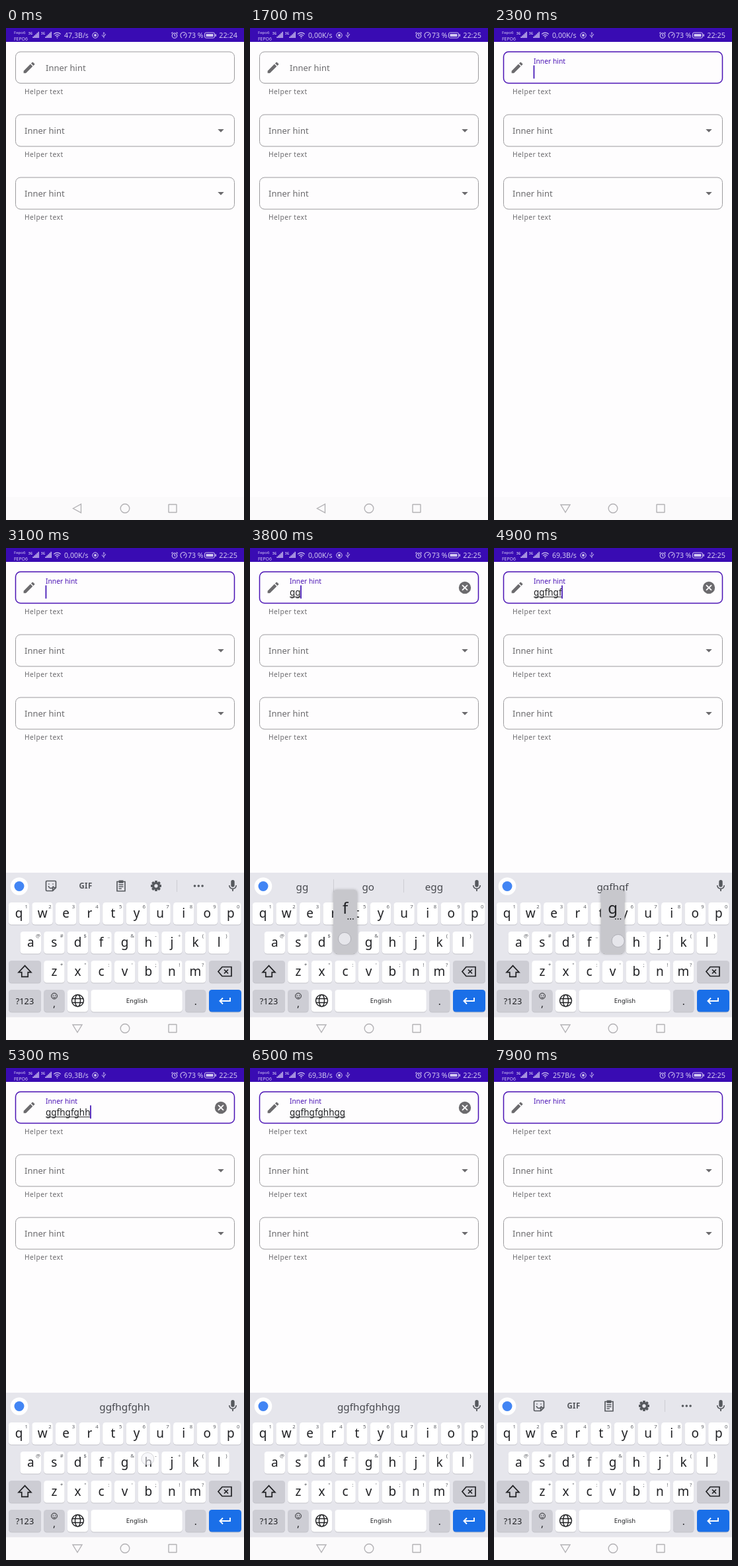
These frames come from a looping animation (360 by 744 pixels, 8000 ms). An HTML page with a canvas:

```html
<!DOCTYPE html>
<html lang="en">
<head>
<meta charset="utf-8">
<title>Text fields</title>
<style>
html, body { margin: 0; width: 100%; height: 100%; overflow: hidden; background: #fefdfe; }
canvas { display: block; width: 360px; height: 744px; }
</style>
</head>
<body>
<canvas id="stage"></canvas>
<script>
const canvas = document.getElementById('stage');
const c = canvas.getContext('2d');
const ratio = window.devicePixelRatio || 1;
canvas.width = 360 * ratio;
canvas.height = 744 * ratio;

const LOOP = 8000, FOCUS = 2100, CLEAR = 7400;
const PURPLE = '#4a12b4', GREY = '#6c6b6e', DARK = '#202124', ICON = '#55585d', STATUS = '#d3c9f2';
const WORD = 'ggfhgfghhgg';
const COMMITS = [3300, 3600, 3850, 4150, 4500, 4800, 5000, 5150, 5300, 5450, 5600];
const SUGGEST = { g: ['g', 'go', 'good'], gg: ['gg', 'go', 'egg'], ggf: ['ggf', 'gift', 'golf'], ggfh: ['ggfh', 'high', 'Gobu'] };
const ROWS = [
  { keys: 'qwertyuiop', hints: '1234567890', x: 19.5, y: 536 },
  { keys: 'asdfghjkl', hints: '@#$_&-+()', x: 37.3, y: 580 },
  { keys: 'zxcvbnm', hints: '*":\';!?', x: 72.9, y: 624 }
];
const PITCH = 35.6;

// Icons on a 24 unit grid
const ICONS = {
  pencil: 'M3 17.25V21h3.75L17.81 9.94l-3.75-3.75zM20.71 7.04a1 1 0 0 0 0-1.41l-2.34-2.34a1 1 0 0 0-1.41 0l-1.83 1.83 3.75 3.75z',
  cancel: 'M12 2a10 10 0 0 0 0 20a10 10 0 0 0 0-20zm5 13.6L15.6 17 12 13.4 8.4 17 7 15.6 10.6 12 7 8.4 8.4 7 12 10.6 15.6 7 17 8.4 13.4 12z',
  mic: 'M12 14a3 3 0 0 0 3-3V5a3 3 0 0 0-6 0v6a3 3 0 0 0 3 3zM17 11a5 5 0 0 1-10 0H5.3a6.7 6.7 0 0 0 5.7 6.6V21h2v-3.4a6.7 6.7 0 0 0 5.7-6.6z',
  shift: 'M12 3.5L3 13h4.5v6.5h9V13H21z',
  erase: 'M8 5H22V19H8L2 12zM11 9l6 6M17 9l-6 6',
  globe: 'M3 12a9 9 0 1 0 18 0a9 9 0 1 0-18 0M3.6 9h16.8M3.6 15h16.8M12 3a4 9 0 0 0 0 18a4 9 0 0 0 0-18',
  enter: 'M20 8v5H4.5M9 8.5L4.5 13 9 17.5',
  sticker: 'M5 3.5h14a1.5 1.5 0 0 1 1.5 1.5v10L15 20.5H5A1.5 1.5 0 0 1 3.5 19V5A1.5 1.5 0 0 1 5 3.5zM15 20v-5h5M8 12a4 4 0 0 0 8 0M8.5 8v1.5M15.5 8v1.5',
  clipboard: 'M5 4.5h14v16.5H5zM9 3h6v3H9zM8 10h8M8 13.5h8M8 17h5',
  wifi: 'M2 9a14 14 0 0 1 20 0M5.5 13a9 9 0 0 1 13 0M9 16.5a4.5 4.5 0 0 1 6 0M11 20h2',
  alarm: 'M4 13a8 8 0 1 0 16 0a8 8 0 1 0-16 0M12 8v5l3 2M2 6l4-4M22 6l-4-4',
  gauge: 'M7 21a10 10 0 1 1 10 0M12 14l5-6',
  usb: 'M12 22V2M9 5l3-3 3 3M12 18l-6-4v-4M12 15l6-4V7'
};
for (const name in ICONS) ICONS[name] = new Path2D(ICONS[name]);

const clamp = v => Math.max(0, Math.min(1, v));
const progress = (t, from, to) => clamp((t - from) / (to - from));
const mix = (a, b, p) => a + (b - a) * p;
const easeOut = p => 1 - (1 - p) ** 3;
const smooth = p => p * p * (3 - 2 * p);

function text(s, x, y, size, color, align = 'left', weight = 400, spacing = 0) {
  c.font = `${weight} ${size}px "Noto Sans", sans-serif`;
  c.letterSpacing = spacing + 'px';
  c.textAlign = align;
  c.fillStyle = color;
  c.fillText(s, x, y);
  return c.measureText(s).width;
}

function paint(fill, stroke, width = 1) {
  if (fill) { c.fillStyle = fill; c.fill(); }
  if (stroke) { c.strokeStyle = stroke; c.lineWidth = width; c.stroke(); }
}

function box(x, y, w, h, r, fill, stroke, width) {
  c.beginPath();
  c.roundRect(x, y, w, h, r);
  paint(fill, stroke, width);
}

function disc(x, y, r, fill, stroke, width) {
  c.beginPath();
  c.arc(x, y, r, 0, 7);
  paint(fill, stroke, width);
}

function poly(points, fill, stroke, width) {
  c.beginPath();
  points.forEach(([x, y]) => c.lineTo(x, y));
  c.closePath();
  paint(fill, stroke, width);
}

function icon(name, x, y, scale, color, lineWidth) {
  c.save();
  c.translate(x - 12 * scale, y - 12 * scale);
  c.scale(scale, scale);
  c.fillStyle = c.strokeStyle = color;
  c.lineWidth = lineWidth;
  if (lineWidth) c.stroke(ICONS[name]); else c.fill(ICONS[name]);
  c.restore();
}

function faded(alpha, draw) {
  c.save();
  c.globalAlpha = alpha;
  draw();
  c.restore();
}

function touch(x, y, alpha = 1) {
  faded(alpha, () => disc(x, y, 9.5, 'rgba(240,240,246,.75)', 'rgba(110,110,120,.35)'));
}

function statusBar(t) {
  box(0, 0, 360, 21, 0, '#390bb3');
  text('Fepo6', 12, 9, 6.1, STATUS);
  text('FEPO6', 12, 18.5, 6.9, STATUS);
  for (const x of [34, 53]) {
    text('3G', x, 10, 4.6, STATUS, 'left', 600);
    for (let i = 0; i < 5; i++) box(x + 6.5 + i * 2, 13 - i * 1.8, 1.4, 2 + i * 1.8, 0, STATUS);
  }
  icon('wifi', 77.5, 11, .53, STATUS, 2.2);
  const speed = t < 900 ? '47,3B/s' : t < 3900 ? '0,00K/s' : t < 6900 ? '69,3B/s' : '257B/s';
  text(speed, t < 6900 ? 88 : 89, 15, 10.6, STATUS);
  disc(135, 11, 4.2, null, STATUS);
  box(133.3, 9.3, 3.4, 3.4, .5, STATUS);
  icon('usb', 148, 11, .42, STATUS, 2);
  icon('alarm', 255, 11, .47, STATUS, 2.4);
  icon('gauge', 268.5, 11, .46, STATUS, 2.2);
  text('73 %', 275, 15, 10.5, STATUS);
  box(300.5, 7, 15, 8, 2, null, STATUS);
  box(302.5, 9, 11, 4, .5, STATUS);
  box(316.5, 9.3, 1.5, 3.4, .5, STATUS);
  text(t < 1700 ? '22:24' : '22:25', 350, 15, 10.9, STATUS, 'right');
}

function inputField(t, value, lastEvent) {
  const p = smooth(progress(t, FOCUS, FOCUS + 170));
  const focused = t >= FOCUS;
  box(14.5, 36, 331, 47.5, 7.5, null, focused ? PURPLE : '#9c9b9e', focused ? 1.5 : 1);
  icon('pencil', 35, 60, .93, GREY);
  text('Inner hint', 60, mix(65, 54, p), mix(13, 10.3, p), focused ? PURPLE : GREY);
  text('Helper text', 28, 100, 10.3, GREY, 'left', 400, .45);
  let width = 0;
  if (value) {
    width = text(value, 60, 72, 13.5, DARK);
    box(60, 73.5, width, 1, 0, DARK);
  }
  if (focused && Math.floor((t - lastEvent) / 500) % 2 === 0) box(59.6 + width, 56.5, 1.7, 20, 0, '#3f10b4');

  const shown = t < CLEAR ? progress(t, 3300, 3420) : 1 - progress(t, CLEAR, CLEAR + 100);
  if (shown) faded(shown, () => icon('cancel', 325, 60, .92, GREY));
  const ripple = progress(t, 7150, 7500);
  if (ripple > 0 && ripple < 1) faded(.14 * (1 - ripple ** 3), () => disc(325, 60, 8 + 11 * easeOut(ripple), '#000'));
}

function dropdown(y) {
  box(14.5, y, 331, 48, 7.5, null, '#9c9b9e');
  text('Inner hint', 28, y + 29, 13, GREY);
  text('Helper text', 28, y + 64, 10.3, GREY, 'left', 400, .45);
  poly([[320.3, y + 22], [329.7, y + 22], [325, y + 26.8]], GREY);
}

function toolbar() {
  icon('sticker', 68, 511, .88, ICON, 1.9);
  text('GIF', 120.5, 515, 11.5, ICON, 'center', 800, .3);
  icon('clipboard', 174, 511, .86, ICON, 1.9);
  for (let i = 0; i < 8; i++) {
    c.save();
    c.translate(227, 511);
    c.rotate(i * Math.PI / 4);
    box(-1.9, -8, 3.8, 5, .8, ICON);
    c.restore();
  }
  disc(227, 511, 4.4, null, ICON, 3.4);
  box(258, 502, 1, 18, 0, '#cdcdd3');
  for (const x of [285.5, 291.3, 297.1]) disc(x, 511, 1.8, ICON);
}

function suggestions(value) {
  const words = SUGGEST[value];
  if (!words) return text(value, 179.5, 517.5, 15.25, '#47494e', 'center');
  words.forEach((word, i) => text(word, 79 + i * 99.7, 517.5, 15.25, '#47494e', 'center'));
  for (const x of [126, 232]) box(x, 501, 1, 20, 0, '#cdcdd3');
}

function key(x, y, w, fill = '#fff') {
  box(x, y + 1, w, 33.5, 4.5, '#c3c3c9');
  box(x, y, w, 33.5, 4.5, fill);
}

function keyboard(value) {
  box(0, 491, 360, 219, 0, '#e6e6ec');
  disc(20, 511.5, 13.3, '#fff');
  disc(20, 511.5, 7.5, '#4285f4');
  icon('mic', 343, 511, .9, ICON);
  if (value) suggestions(value); else toolbar();

  for (const { keys, hints, x, y } of ROWS) {
    [...keys].forEach((letter, i) => {
      const cx = x + i * PITCH;
      key(cx - 15.7, y, 31.4);
      text(letter, cx, y + 22.7, 19, DARK, 'center');
      text(hints[i], cx + 11.3, y + 9, 7.8, '#5c5e63', 'center');
    });
  }
  const soft = '#cdcdd4';
  key(4, 624, 49, soft);
  icon('shift', 28.5, 640.5, 1.05, DARK, 1.6);
  key(307, 624, 49, soft);
  icon('erase', 331, 640.5, 1, DARK, 1.7);

  key(4, 668, 49, soft);
  text('?123', 28.5, 689.5, 12.8, DARK, 'center');
  key(57.2, 668, 31.4, soft);
  disc(73, 677.5, 4.4, null, DARK);
  disc(71.4, 676.4, .7, DARK);
  disc(74.6, 676.4, .7, DARK);
  c.beginPath();
  c.arc(73, 677.8, 2.2, .3, 2.84);
  paint(null, DARK, .9);
  text(',', 73, 694, 15, DARK, 'center');
  key(92.8, 668, 31.4);
  icon('globe', 108.5, 684.5, 1, DARK, 1.4);
  key(128.4, 668, 138.4);
  text('English', 198, 688.3, 9.5, DARK, 'center');
  key(271, 668, 31.4, soft);
  text('.', 286.8, 691, 15, DARK, 'center');
  key(307, 668, 49, '#1a6fe8');
  icon('enter', 331, 684, 1, '#fff', 1.9);
}

function keyPress(t) {
  const i = COMMITS.findIndex(at => t >= at - 120 && t < at + 80);
  if (i < 0) return;
  const letter = WORD[i], row = ROWS[1];
  const cx = row.x + row.keys.indexOf(letter) * PITCH;
  const held = t < COMMITS[i];
  if (held) {
    c.save();
    c.shadowColor = 'rgba(0,0,0,.25)';
    c.shadowBlur = 4 * ratio;
    box(cx - 18, row.y - 63, 36, 96, 5, '#c7c7cc');
    c.restore();
    text(letter, cx, row.y - 27, 24, DARK, 'center');
    text('...', cx + 8, row.y - 18, 14, DARK, 'center');
  }
  touch(cx + (letter === 'g' ? 8 : -1), row.y + (letter === 'g' ? 14 : 11), held ? 1 : .75);
}

function navBar(t) {
  box(0, 709.5, 360, 34.5, 0, '#fbfafb');
  const line = '#b3b2b5';
  poly(t < 2200 ? [[101.5, 726.5], [113.5, 720], [113.5, 733]] : [[101, 721], [115, 721], [108, 732.5]], null, line, 1.4);
  disc(180, 726.5, 6.8, null, line, 1.4);
  box(246, 720.5, 12, 12, .5, null, line, 1.4);
}

function draw(t) {
  const typed = t < CLEAR ? COMMITS.filter(at => at <= t).length : 0;
  const value = WORD.slice(0, typed);
  const lastEvent = t >= CLEAR ? CLEAR : typed ? COMMITS[typed - 1] : FOCUS;

  c.setTransform(ratio, 0, 0, ratio, 0, 0);
  box(0, 0, 360, 744, 0, '#fefdfe');
  statusBar(t);
  inputField(t, value, lastEvent);
  dropdown(131);
  dropdown(226);
  const rise = easeOut(progress(t, 2350, 2700));
  if (rise) {
    c.save();
    c.translate(0, 219 * (1 - rise));
    keyboard(value);
    c.restore();
    keyPress(t);
  }
  navBar(t);
  if (t >= 2000 && t < 2150) touch(180, 62);
  if (t >= 7100 && t < 7350) touch(325, 62);
}

const start = performance.now();
function frame() {
  draw((performance.now() - start) % LOOP);
  requestAnimationFrame(frame);
}
frame();
</script>
</body>
</html>
```
